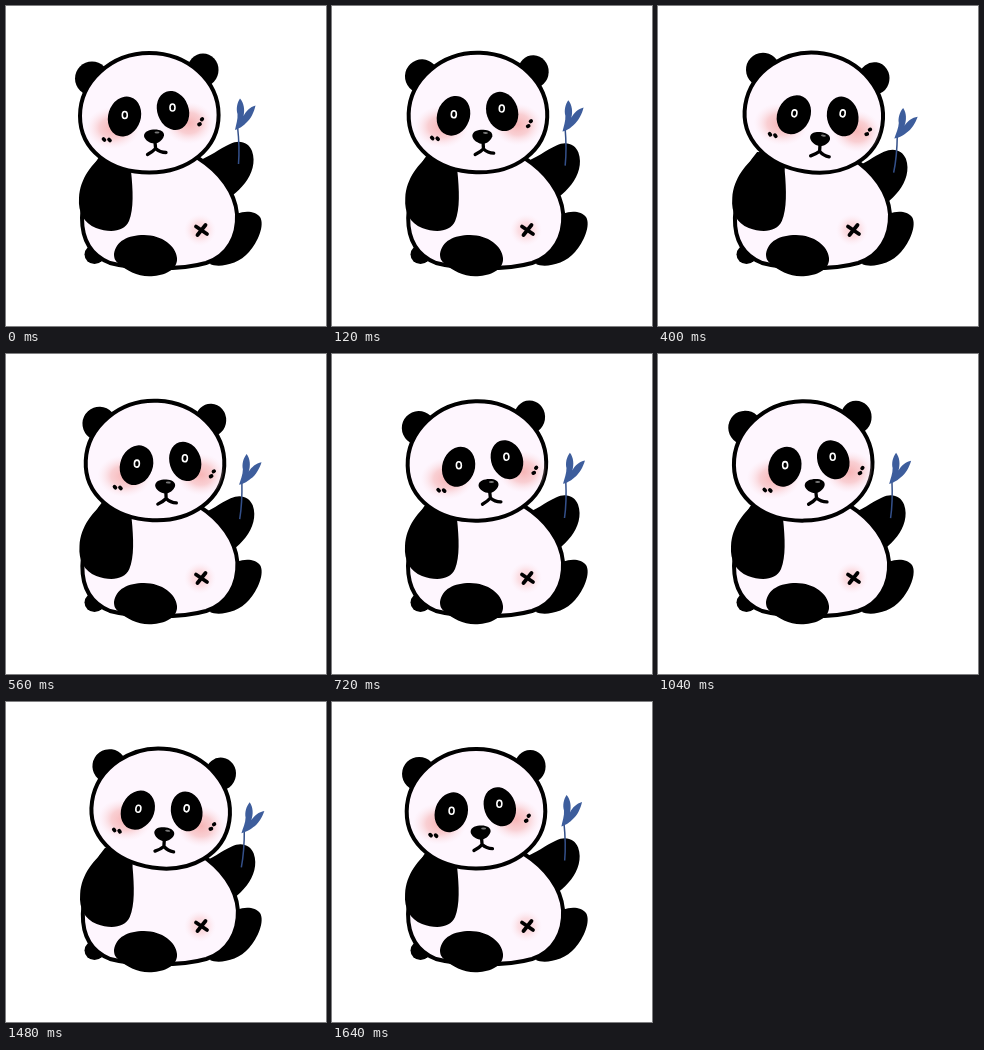
An HTML page that plays this animation: 320x320 px, repeating every 2 s.

```html
<!DOCTYPE html>
<html lang="en">
<head>
<meta charset="utf-8">
<title>Panda</title>
<style>
html, body { margin: 0; width: 100%; height: 100%; overflow: hidden; background: #fff; }
svg { display: block; width: 100%; height: 100%; }
.line { fill: none; stroke: #000; stroke-linecap: round; stroke-linejoin: round; }
.skin { fill: #fef6fe; stroke: #000; stroke-width: 4; }
.ring { fill: none; stroke: #fff; stroke-width: 1.6; }
</style>
</head>
<body>
<svg viewBox="0 0 320 320">
  <defs>
    <radialGradient id="blush">
      <stop offset="0" stop-color="#f5a9a9" stop-opacity=".85"/>
      <stop offset=".5" stop-color="#f6b5b6" stop-opacity=".6"/>
      <stop offset="1" stop-color="#fbe0e6" stop-opacity="0"/>
    </radialGradient>
    <path id="skull" d="M143.300 47C105 47 74 76 74 110C74 144 104 166.500 143.300 166.500C182 166.500 212.600 143 212.600 109C212.600 75 182 47 143.300 47Z"/>
    <clipPath id="headClip"><use href="#skull"/></clipPath>
  </defs>

  <!-- limbs behind the body -->
  <path d="M222 214C231 204 248 203 254 211C259 219 252 236 243 246C232 259 212 262 204 258Z"/>
  <ellipse cx="88.500" cy="248.500" rx="10" ry="9.500"/>
  <path id="arm" d="M190 156C205 150 213 143 224 138C234 133 243 137 246 145C250 156 246 168 239 177C235 182 231 186 227 189L200 185Z"/>

  <g id="trunk">
    <path class="skin" d="M98 148C86 162 76 190 76 212C76 233 84 249 104 257C130 264 176 264 200 257C222 250 232 230 231 208C229 186 214 166 192 152Z"/>
    <path d="M100 146C86 158 74 172 73 192C72 207 78 217 90 222C104 227 118 226 123 215C128 203 127 184 125 165V150Z"/>
  </g>
  <circle cx="194" cy="224" r="16" fill="url(#blush)" opacity=".6"/>
  <path class="line" stroke-width="3.800" d="M190 220.500L201 228M199.500 219L191.500 229"/>
  <path d="M108 248C110 235 122 229 138 229C156 229 170 240 171 252C172 262 161 269 148 270C134 272 121 265 113 258C109 255 108 252 108 248Z"/>

  <g id="sprig">
    <path d="M232.500 158C233.500 146 233 134 231.500 120" fill="none" stroke="#34508a" stroke-width="1.500"/>
    <path d="M234 92.500C231 97 230 103 231.500 108C232 113 230 119 229 124C235 122 238 119 240 117C245 113 248 106 249.500 99.500C244 101 240 105 237.500 110C239 104 238 97 234 92.500Z" fill="#3d5d9c"/>
  </g>

  <g id="head">
    <ellipse cx="86" cy="72.500" rx="17" ry="17"/>
    <ellipse cx="197" cy="64" rx="15.500" ry="16.500"/>
    <use class="skin" href="#skull"/>
    <g clip-path="url(#headClip)">
      <g id="face">
        <ellipse cx="107" cy="122" rx="27" ry="21" fill="url(#blush)"/>
        <ellipse cx="183" cy="117" rx="25" ry="21" fill="url(#blush)"/>
        <ellipse cx="118.500" cy="110.500" rx="16.300" ry="20.300" transform="rotate(18 118.500 110.500)"/>
        <ellipse cx="167" cy="104.500" rx="15.700" ry="20" transform="rotate(-20 167 104.500)"/>
        <ellipse class="ring" cx="118.800" cy="109" rx="2.500" ry="3.500"/>
        <ellipse class="ring" cx="166.500" cy="101.500" rx="2.500" ry="3.500"/>
        <path d="M138 130C138 125 144 123.500 149 123.500C154 123.500 158.500 125.500 158 129.500C157 134 152 137.500 148.500 137.500C144 137.500 138.500 134 138 130Z"/>
        <ellipse cx="151" cy="126.500" rx="2.500" ry="1" fill="#777"/>
        <path class="line" stroke-width="3.300" d="M149 136L149.600 142.500Q147 145.500 141.500 148.500M149.600 142.500Q154 146.500 160 146.500"/>
        <path class="line" stroke-width="3.700" d="M97.500 133l1 1M103 133.500l1 1M193 118.500l1-.5M195.700 113.500l.6-.5"/>
      </g>
    </g>
  </g>
</svg>
<script>
const LOOP = 2000, STEP = 40;
const $ = id => document.getElementById(id);

const ease = (a, b, t) => (1 - Math.cos(Math.PI * Math.min(1, Math.max(0, (t - a) / (b - a))))) / 2;
const pose = (id, value) => $(id).setAttribute('transform', value);

// The sway plays forward, rests, then plays backward.
function swayTime(t) {
  if (t < 80) return 40;
  if (t < 1040) return Math.min(t, 720);
  return Math.max(1720 - t, 80);
}

function draw(now) {
  const u = swayTime(Math.floor((now % LOOP) / STEP) * STEP);
  const rise = ease(40, 320, u);
  const sway = u < 320 ? rise : 1 - ease(320, 720, u);
  const look = ease(40, 560, u);
  const turn = ease(40, 720, u);

  pose('head', `translate(${3 * rise} 0) rotate(${10.7 * sway - 1.3 * turn} 150 170)`);
  pose('face', `translate(${6.4 * look} ${1.7 * rise})`);

  const dx = 3.5 * sway, dy = 6 * rise + 3 * sway;
  pose('arm', `translate(${dx * 0.6} ${dy * 0.9})`);
  pose('sprig', `translate(${dx} ${dy}) rotate(${3.4 * rise + 4 * sway} 232.5 158)`);
  pose('trunk', `translate(0 265) skewX(${-1.1 * sway}) translate(0 -265)`);
}

function tick() {
  draw(performance.now());
  requestAnimationFrame(tick);
}
tick();
</script>
</body>
</html>
```
